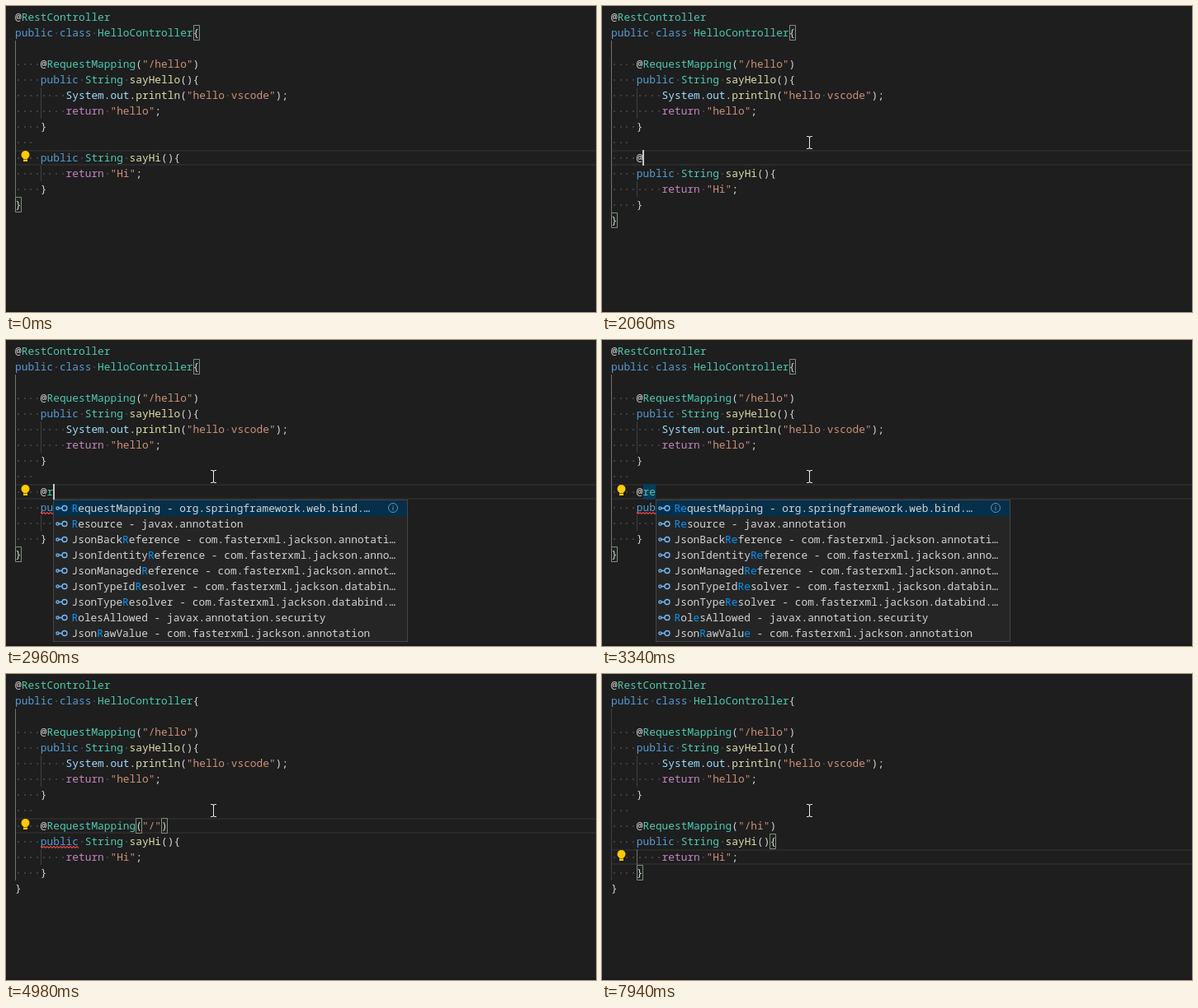
Recreate the animation shown at these times as an HTML page with a canvas. Size 715 by 372 pixels, loop 8 s.

```html
<!DOCTYPE html>
<html lang="en">
<head>
<meta charset="utf-8">
<style>
html, body { margin: 0; width: 100%; height: 100%; overflow: hidden; background: #1e1e1e; }
canvas { display: block; }
</style>
</head>
<body>
<canvas id="stage" width="715" height="372"></canvas>
<script>
const ctx = document.getElementById('stage').getContext('2d');
const LOOP = 8000, CELL = 7.698, ROW = 19, LEFT = 11;
const colX = col => LEFT + col * CELL;
const rowY = row => 4 + row * ROW;

const HEAD = [
  '@RestController',
  'public class HelloController{',
  '',
  '    @RequestMapping("/hello")',
  '    public String sayHello(){',
  '        System.out.println("hello vscode");',
  '        return "hello";',
  '    }',
  '   '
];
const TAIL = [
  '    public String sayHi(){',
  '        return "Hi";',
  '    }',
  '}'
];

const TOKENS = /(".*?")|\b(public|class)\b|\b(return)\b|\b(RestController|HelloController|RequestMapping|String|re?)\b|\b(sayHello|sayHi|println)\b|\b(System|out)\b/g;
const COLORS = ['#ce9178', '#569cd6', '#c586c0', '#4ec9b0', '#dcdcaa', '#9cdcfe'];

const ALL = [
  'Deprecated - java.lang',
  'Override - java.lang',
  'RequestMapping - org.springframework.web.bind.anno…',
  'SafeVarargs - java.lang',
  'SuppressWarnings - java.lang',
  'Attr - com.fasterxml.jackson.databind.annotation.J…',
  'BeanProperty - java.beans',
  'DefaultClass - ch.qos.logback.core.joran.spi',
  'DenyAll - javax.annotation.security',
  'Generated - javax.annotation'
];
const FILTERED = [
  'RequestMapping - org.springframework.web.bind.…',
  'Resource - javax.annotation',
  'JsonBackReference - com.fasterxml.jackson.annotati…',
  'JsonIdentityReference - com.fasterxml.jackson.anno…',
  'JsonManagedReference - com.fasterxml.jackson.annot…',
  'JsonTypeIdResolver - com.fasterxml.jackson.databin…',
  'JsonTypeResolver - com.fasterxml.jackson.databind.…',
  'RolesAllowed - javax.annotation.security',
  'JsonRawValue - com.fasterxml.jackson.annotation'
];

// Each step changes part of the editor state; pairs hold [row, col] of matched brackets.
const ON = { blink: true }, OFF = { blink: false };
const STEPS = [
  [0, { typed: null, caret: [9, 11], blink: false, bulb: 9, pair: [[1, 28], [12, 0]],
        query: null, squiggle: false, mark: false }],
  [300, ON], [600, OFF], [900, ON], [1200, OFF],
  [1500, { caret: [8, 3], blink: true, bulb: null }],
  [1720, { typed: '', caret: [9, 4], pair: [[1, 28], [13, 0]] }],
  [2060, { typed: '@', caret: [9, 5] }],
  [2240, { query: '' }],
  [2380, { bulb: 9 }],
  [2640, { squiggle: true }],
  [2960, { typed: '@r', caret: [9, 6], query: 'r' }],
  [3100, { typed: '@re', caret: [9, 7], query: 're' }],
  [3340, { mark: true, blink: false }],
  [3440, { typed: '@RequestMapping', caret: [9, 19], query: null, mark: false, blink: true }],
  [3760, OFF],
  [3960, { typed: '@RequestMapping()', caret: [9, 20], blink: true, pair: [[9, 19], [9, 20]] }],
  [4300, { bulb: null, blink: false }],
  [4400, { typed: '@RequestMapping("")', caret: [9, 21], blink: true, pair: [[9, 19], [9, 22]] }],
  [4680, { typed: '@RequestMapping("/")', caret: [9, 22], pair: [[9, 19], [9, 23]] }],
  [4980, { bulb: 9, blink: false }],
  [5220, { squiggle: false }],
  [5280, ON],
  [5560, { typed: '@RequestMapping("/h")', caret: [9, 23], pair: [[9, 19], [9, 24]] }],
  [5620, { typed: '@RequestMapping("/hi")', caret: [9, 24], pair: [[9, 19], [9, 25]] }],
  [5940, OFF], [6240, ON], [6560, OFF],
  [6900, { caret: [10, 24], blink: true, bulb: null, pair: [[10, 23], [10, 24]] }],
  [7040, { caret: [11, 20], pair: [[10, 25], [12, 4]] }],
  [7300, { bulb: 11, blink: false }],
  [7620, ON], [7940, OFF]
];

const stateAt = t => Object.assign({}, ...STEPS.filter(s => s[0] <= t).map(s => s[1]));

function rect(x, y, w, h, color) {
  ctx.fillStyle = color;
  ctx.fillRect(x, y, w, h);
}

function stroke(color, width, draw) {
  ctx.strokeStyle = color;
  ctx.lineWidth = width;
  ctx.beginPath();
  draw();
  ctx.stroke();
}

function text(str, x, top, colorOf) {
  [...str].forEach((ch, i) => {
    ctx.fillStyle = colorOf(i);
    if (ch !== ' ') ctx.fillText(ch, x + i * CELL, top + 14);
  });
}

function codeLine(line, row) {
  const colors = Array(line.length).fill('#d4d4d4');
  for (const m of line.matchAll(TOKENS)) {
    const kind = m.slice(1).findIndex(Boolean);
    colors.fill(COLORS[kind], m.index, m.index + m[0].length);
  }
  [...line].forEach((ch, i) => {
    if (ch === ' ') rect(Math.round(colX(i + .5)) - 1, rowY(row) + 9, 2, 2, '#3f3f3f');
  });
  text(line, LEFT, rowY(row), i => colors[i]);
}

function guides(count, caretRow) {
  const inner = caretRow === 11;
  const guide = (x, from, to, active) =>
    rect(x, rowY(from), 1, (to - from) * ROW, active ? '#707070' : '#404040');
  guide(11, 2, count - 1, !inner);
  guide(42, 5, 7, false);
  guide(42, count - 3, count - 2, inner);
}

function bulb(row) {
  const y = rowY(row);
  ctx.fillStyle = '#ffcc00';
  ctx.beginPath();
  ctx.arc(23.5, y + 6, 5, 0, 7);
  ctx.fill();
  rect(21, y + 9, 5, 5, '#ffcc00');
  rect(21, y + 11, 5, 1, '#8a7110');
}

function squiggle() {
  const y = rowY(10) + 15.5;
  stroke('#ea4646', 1.1, () => {
    for (let x = 42; x <= 88; x += 2) ctx.lineTo(x, y + (x % 4 ? 0 : 2));
  });
}

// Indices of matched letters: a run if there is one, else scattered.
function hits(label, query) {
  const low = label.toLowerCase();
  let at = low.indexOf(query);
  if (at >= 0) return [...query].map((_, k) => at + k);
  return [...query].map(ch => at = low.indexOf(ch, at + 1));
}

function suggestions(query, col) {
  const items = query ? FILTERED : ALL;
  const x = Math.round(colX(col)), y = rowY(10), w = 430;
  const h = query ? items.length * ROW + 2 : 230;
  rect(x, y, w, h, '#454545');
  rect(x + 1, y + 1, w - 2, h - 2, '#252526');
  rect(x + 1, y + 1, w - 2, ROW, '#062f4a');
  items.forEach((item, i) => {
    const top = y + 1 + i * ROW, mid = top + 9.5;
    stroke('#75beff', 1.3, () => {
      ctx.arc(x + 5.5, mid, 1.6, 0, 7);
      ctx.moveTo(x + 7, mid);
      ctx.lineTo(x + 11, mid);
      ctx.moveTo(x + 17, mid);
      ctx.arc(x + 14, mid, 3, 0, 7);
    });
    const found = hits(item, query);
    text(item, x + 22.5, top, k => found.includes(k) ? '#0097fb' : '#d4d4d4');
  });
  const ix = x + (query ? 412 : 410), iy = y + 10;
  if (!query) {
    text('java.lang.Deprecated', x + 245, y + 1, () => '#94a5b0');
    rect(x + 418, y + 1, 10, 55, '#4a4a4b');
  }
  stroke('#6a93b2', 1, () => ctx.arc(ix, iy, 5.5, 0, 7));
  rect(ix - .5, iy - 3, 1, 1, '#6a93b2');
  rect(ix - .5, iy - 1, 1, 4, '#6a93b2');
}

function pointer(t) {
  if (t < 20) return;
  const ease = u => { u = Math.min(1, Math.max(0, u)); return u * u * (3 - 2 * u); };
  const a = ease((t - 20) / 440), b = ease((t - 460) / 440);
  const x = Math.round(96 * a + 155 * b), y = Math.round(37 + 157 * a - 28 * b);
  const beam = () => {
    ctx.moveTo(x - 3, y - 7.5);
    ctx.lineTo(x - 1, y - 7.5);
    ctx.lineTo(x + .5, y - 6.5);
    ctx.lineTo(x + 2, y - 7.5);
    ctx.lineTo(x + 4, y - 7.5);
    ctx.moveTo(x + .5, y - 6.5);
    ctx.lineTo(x + .5, y + 6.5);
    ctx.moveTo(x - 3, y + 7.5);
    ctx.lineTo(x - 1, y + 7.5);
    ctx.lineTo(x + .5, y + 6.5);
    ctx.lineTo(x + 2, y + 7.5);
    ctx.lineTo(x + 4, y + 7.5);
  };
  stroke('#111', 2.4, beam);
  stroke('#e8e8e8', 1.1, beam);
}

function render(t) {
  const s = stateAt(t);
  const lines = [...HEAD, ...(s.typed === null ? [] : ['    ' + s.typed]), ...TAIL];
  const [row, col] = s.caret;
  rect(0, 0, 715, 372, '#1e1e1e');
  rect(0, 370, 715, 2, '#191919');
  ctx.font = '12.83px "Noto Sans Mono", "DejaVu Sans Mono", monospace';

  rect(LEFT, rowY(row), 704, 2, '#2a2a2a');
  rect(LEFT, rowY(row) + 17, 704, 2, '#2a2a2a');
  if (s.mark) rect(50, rowY(9), 15, ROW, '#083d5a');
  guides(lines.length, row);
  for (const [r, c] of s.pair) {
    const x = Math.round(colX(c));
    rect(x, rowY(r), 8, ROW, '#1b251b');
    stroke('#888', 1, () => ctx.rect(x + .5, rowY(r) + .5, 7, ROW - 1));
  }
  lines.forEach(codeLine);
  if (s.squiggle) squiggle();
  if (s.bulb !== null) bulb(s.bulb);
  if (s.blink) rect(Math.floor(colX(col)), rowY(row), 2, ROW, '#c8c8c6');
  if (s.query !== null) suggestions(s.query, col);
  pointer(t);
}

const start = performance.now();
function tick() {
  render((performance.now() - start) % LOOP);
  requestAnimationFrame(tick);
}
tick();
</script>
</body>
</html>
```
